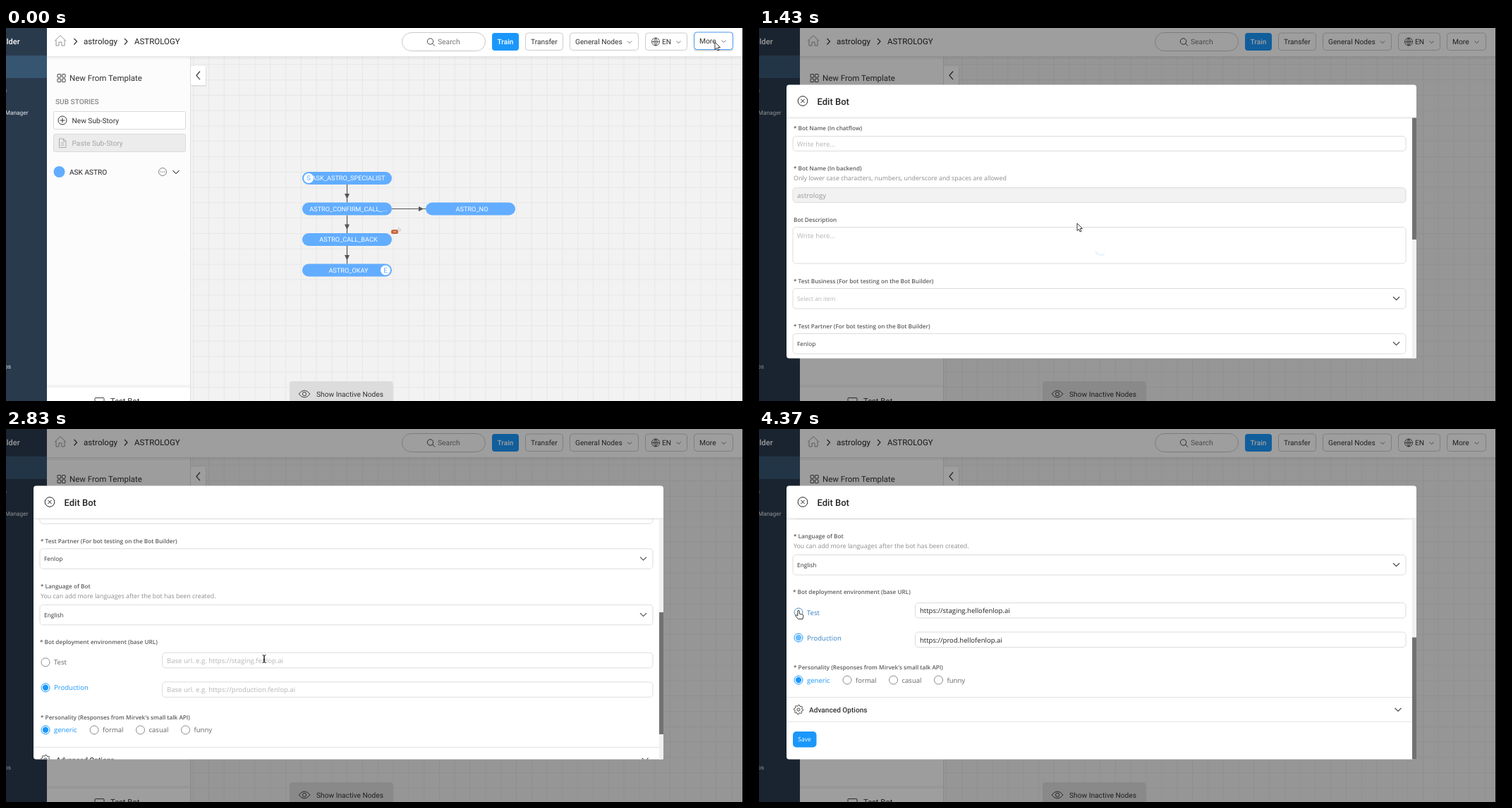
An HTML page for the animation above (4460 ms loop, 1059x529 px).

```html
<!DOCTYPE html>
<html lang="en">
<head>
<meta charset="utf-8">
<title>Edit Bot</title>
<style>
html, body { margin: 0; width: 100%; height: 100%; overflow: hidden; background: #000; }
svg { display: block; width: 1059px; height: 529px; text-rendering: geometricPrecision; }
.ui { font-family: Roboto, sans-serif; }
.form { font-family: "Open Sans", "Noto Sans", sans-serif; }
text { white-space: pre; }
</style>
</head>
<body>
<svg id="stage" viewBox="0 0 1059 529" xmlns="http://www.w3.org/2000/svg"></svg>
<script>
const LOOP = 4460;
const BLUE = '#1b97fb', NODE = '#62adff', INK = '#333', EDGE = '#555';

// ---- drawing helpers ----
const text = (x, y, s, size, fill = INK, more = '') =>
  `<text x="${x}" y="${y}" font-size="${size}" fill="${fill}" ${more}>${s}</text>`;
const rect = (x, y, w, h, fill, r = 0, more = '') =>
  `<rect x="${x}" y="${y}" width="${w}" height="${h}" rx="${r}" fill="${fill}" ${more}/>`;
const path = (d, stroke = INK, width = 1, more = '') =>
  `<path d="${d}" fill="none" stroke="${stroke}" stroke-width="${width}" ${more}/>`;
const circle = (x, y, r, fill, more = '') =>
  `<circle cx="${x}" cy="${y}" r="${r}" fill="${fill}" ${more}/>`;
const ring = (x, y, r, stroke = INK, width = 1, more = '') =>
  circle(x, y, r, 'none', `stroke="${stroke}" stroke-width="${width}" ${more}`);
const down = (x, y, w = 4.5, stroke = '#444', width = 1.1) =>
  path(`M${x - w} ${y - w / 2}l${w} ${w}l${w} ${-w}`, stroke, width);
const border = c => `stroke="${c}" stroke-width="1"`;
const group = (id, body, more = '') => `<g id="${id}" ${more}>${body}</g>`;
const mid = 'text-anchor="middle"', end = 'text-anchor="end"';

// ---- page behind the dialog ----
function grid() {
  let d = '';
  for (let x = 265.7; x < 1044; x += 21.8) d += `M${x.toFixed(1)} 41V529`;
  for (let y = 51.7; y < 529; y += 21.8) d += `M262 ${y.toFixed(1)}H1044`;
  return path(d, '#e7e7e7');
}

function node(x, y, label, labelX = x + 65.5) {
  return rect(x, y - 9, 127, 18, NODE, 9) + text(labelX, y + 3.3, label, 9.2, '#fff', mid);
}

const badge = (x, y, s) =>
  circle(x, y, 7, '#fff') + text(x, y + 3.4, s, 9.5, NODE, mid);

function flow() {
  let s = '';
  for (const y of [222, 265.5, 309]) {
    s += path(`M483.5 ${y}v25.5`, EDGE, 1.2) +
      `<path d="M480 ${y + 13}h7l-3.5 7.5z" fill="${EDGE}"/>`;
  }
  s += path('M547 256.5h48', EDGE, 1.2) + `<path d="M585 253v7l7-3.5z" fill="${EDGE}"/>`;
  s += node(420, 213, 'ASK_ASTRO_SPECIALIST', 485.5) + badge(429, 213, 'S');
  s += node(420, 256.5, 'ASTRO_CONFIRM_CALL_...') + node(595, 256.5, 'ASTRO_NO', 660.5);
  s += node(420, 300, 'ASTRO_CALL_BACK');
  s += node(420, 343.5, 'ASTRO_OKAY') + badge(538, 343.5, 'E');
  s += rect(546, 286, 10, 6, '#c8653c', 2.5) + rect(549, 288.3, 4, 1.2, '#f0c0a8') +
    path('M555 285a4 4 0 0 1 3 4M556 283a6 6 0 0 1 4 5', '#bbb', .8);
  return s;
}

function sidebar() {
  return rect(0, 0, 58, 529, '#2a3a4d') + rect(0, 39, 58, 32, '#365570') +
    text(19.5, 23, 'Builder', 11, '#fff', end + ' font-weight="500"') +
    text(1, 91, 's', 8.3, '#e6eaee', end) +
    text(31.5, 123, 'Manager', 8.3, '#e6eaee', end) +
    text(7, 483, 'os', 8.3, '#e6eaee', end);
}

function stories() {
  let s = rect(58, 41, 204, 488, '#fcfcfc') + path('M261.5 41V529', '#dedede');
  for (const [x, y] of [[73, 65.5], [79.5, 65.5], [73, 72], [79.5, 72]])
    s += rect(x, y, 4.6, 4.6, 'none', .6, border('#444'));
  s += text(90, 75, 'New From Template', 11.5);
  s += text(70, 108, 'SUB STORIES', 10.1, '#888', 'font-weight="500"');
  s += rect(67.5, 118.5, 187, 25, '#fff', 2, border('#d9d9d9')) + ring(80, 131, 6) +
    path('M76.5 131h7M80 127.500v7') + text(93.5, 134.7, 'New Sub-Story', 10.2);
  s += rect(67.5, 150.5, 187, 25, '#ececec', 2, border('#d9d9d9')) +
    path('M75.500 157h6l3.500 3.500v9h-9.500zM81.500 157v3.500h3.500M77.500 163h5M77.500 166h5', '#aaa') +
    text(93.5, 166.700, 'Paste Sub-Story', 10.2, '#a5a5a5');
  s += circle(75.5, 204, 8, NODE) + text(90, 207.600, 'ASK ASTRO', 10.1, '#222');
  s += ring(222, 204, 5.5, '#777', .9);
  for (const x of [219.500, 222, 224.500]) s += circle(x, 204, .7, '#777');
  s += down(241, 204.300, 4.5);
  s += rect(58, 506, 203, 4, '#f3f3f3') + rect(58, 510, 203, 19, '#fff') +
    rect(126, 524.500, 13, 9, 'none', 1, border('#444')) + text(148, 532.500, 'Test Bot', 11.2);
  return s;
}

const button = (x, w, label, labelX, more = '') =>
  rect(x + .5, 7, w - 1, 24.5, '#fff', 4, border('#ccc')) + text(labelX, 23, label, 10.2) + more;

function header() {
  let s = rect(58, 41, 986, 3, '#000', 0, 'opacity=".04"') + rect(58, 0, 986, 41, '#fff') +
    path('M58 40.5H1044', '#e2e2e2');
  s += path('M69 18.500L77 10.500L85 18.500M71 17v8h4v-5h4v5h4v-8', '#888', .9);
  s += path('M96.500 15l4 4l-4 4.500M168 15l4 4l-4 4.500', INK, 1.2);
  s += text(110, 23, 'astrology', 11.6, '#222') + text(182, 23, 'ASTROLOGY', 11.5, '#222');
  s += rect(561.5, 6.500, 118, 26, '#fff', 13, border('#c8c8c8')) +
    ring(601.500, 19, 4.2, '#444') + path('M604.500 22l3.500 3.500', '#444') +
    text(612, 23, 'Search', 10.3, '#777');
  s += rect(689, 7, 38, 25, BLUE, 4) +
    text(708, 23, 'Train', 10.1, '#fff', mid + ' font-weight="500"');
  s += button(736, 54, 'Transfer', 744) + button(799, 98, 'General Nodes', 807, down(884, 20, 3, '#777', 1));
  s += button(906, 60, 'EN', 930, down(953.500, 20, 3, '#777', 1) + ring(921, 19.500, 5.5, '#444', .9) +
    path('M915.500 19.500h11M921 14v11M921 14q-5 5.500 0 11M921 14q5 5.500 0 11', '#444', .8));
  s += group('more', rect(975, 7, 56, 27, '#000', 4, 'id="moreShade" opacity=".12"') +
    rect(975.5, 7, 55, 24.500, '#fff', 4, border('#ccc') + ' id="moreBox"') +
    text(983, 23, 'More', 10.3) + down(1017.500, 20, 3, '#777', 1));
  return s;
}

function page() {
  return rect(262, 41, 782, 488, '#f2f2f2') + grid() + flow() + stories() + header() + sidebar() +
    rect(262, 55, 22, 28, '#000', 3, 'opacity=".07"') + rect(262, 54, 21, 27, '#fff', 2) +
    path('M275 61.500l-5 5.800l5 5.800', INK, 1.2) +
    rect(402, 502, 147, 40, '#000', 4, 'opacity=".06"') + rect(402, 501, 146, 40, '#dcdcdc', 4) +
    path('M415 519q8-10 16 0q-8 10-16 0z', '#444') + ring(423, 519, 2.6, '#444') +
    text(440, 522.700, 'Show Inactive Nodes', 10.2);
}

const menu = () =>
  rect(870, 37, 162, 181, '#000', 4, 'opacity=".08"') + rect(871, 37, 160, 178, '#fff', 3) +
  rect(871, 47, 160, 29, '#f1f5f9') + text(885, 65.5, 'Edit Bot', 10.2);

// ---- dialog ----
const label = (y, s, x = 49) => text(x, y, s, 8.2, '#5c5c5c', 'font-weight="600"');
const hint = (y, s) => text(49, y, s, 8.87, '#8c8c8c');
const box = (y, h, x = 48, fill = '#fff') =>
  rect(x, y + .5, 917 - x, h - 1, fill, 4.5, border('#dcdcdc'));
const select = (y, s, fill, id = '') =>
  box(y, 29.500) + text(54, y + 18, s, 8.35, fill, id && `id="${id}"`) + down(903.500, y + 14.500);
const radio = (x, y, s, on, id = '') =>
  ring(x, y, 6, on ? BLUE : '#8a8a8a', 1, id && `id="${id}Ring"`) +
  (on ? circle(x, y, 4.2, BLUE, id && `id="${id}Dot"`) : '') +
  text(x + 12, y + 3.500, s, 9.55, on ? BLUE : '#666', id && `id="${id}Text"`);

function gear(x, y) {
  let d = '';
  for (let i = 0; i < 32; i++) {
    const a = i * Math.PI / 16, r = i % 4 < 2 ? 6.6 : 5.1;
    d += (i ? 'L' : 'M') + (x + r * Math.cos(a)).toFixed(1) + ' ' + (y + r * Math.sin(a)).toFixed(1);
  }
  return path(d + 'z', '#444') + ring(x, y, 2.1, '#444');
}

function form() {
  const pale = '#b5b5b5';
  return label(145, '* Bot Name (In chatflow)') + box(153, 22) + text(54, 167.500, 'Write here...', 9.5, pale) +
    label(202, '* Bot Name (In backend)') +
    hint(216, 'Only lower case characters, numbers, underscore and spaces are allowed') +
    box(226, 22, 48, '#f2f2f2') + text(54, 240.500, 'Write here...', 9.6, '#b0b0b0', 'id="backend"') +
    label(274.500, 'Bot Description') + box(282, 52.500) + text(54, 297.500, 'Write here...', 9.5, pale) +
    label(361.500, '* Test Business (For bot testing on the Bot Builder)') + select(369, 'Select an item', pale) +
    label(425.500, '* Test Partner (For bot testing on the Bot Builder)') + select(433, 'Select an item', pale, 'partner') +
    label(489.500, '* Language of Bot') + hint(503.500, 'You can add more languages after the bot has been created.') +
    select(512.500, 'English', INK) +
    label(568.500, '* Bot deployment environment (base URL)', 48) +
    radio(56, 594.500, 'Test', false, 'test') + box(580.500, 22.500, 221.5) + text(228, 595.700, '', 9.55, pale, 'id="staging"') +
    radio(56, 630.500, 'Production', true, 'prod') + box(622, 22.500, 221.5) + text(228, 637, '', 9.55, pale, 'id="live"') +
    label(675.500, "* Personality (Responses from Mirvek's small talk API)") +
    radio(56, 690.500, 'generic', true) + radio(125, 690.500, 'formal') +
    radio(190.500, 690.500, 'casual') + radio(254.500, 690.500, 'funny') +
    path('M39 715H926M39 749.500H926', '#e2e2e2') + gear(56, 732.500) +
    `<g class="ui">${text(71, 736.200, 'Advanced Options', 10.1, INK, 'font-weight="500"')}</g>` +
    down(906, 732.500) +
    rect(48, 763.500, 33.500, 22.500, BLUE, 5) + text(64.500, 777.700, 'Save', 8.5, '#fff', mid);
}

function dialog() {
  return rect(39, 80.500, 893, 388, '#fff', 4) +
    `<g clip-path="url(#body)" class="form">${group('form', form())}</g>` +
    rect(926, 127, 6, 341.500, '#f1f1f1') + rect(926, 127, 6, 173, '#717171', 0, 'id="thumb"') +
    rect(39, 127, 887, 2, '#000', 0, 'opacity=".04"') + path('M39 127H932', '#e0e0e0') +
    ring(62, 103.500, 6.8, '#222') + path('M59.300 100.800l5.400 5.400M64.700 100.800l-5.400 5.400', '#222') +
    text(82.500, 109, 'Edit Bot', 13, '#222', 'font-weight="500"') +
    path('M485 304a9 9 0 0 1 9 9', BLUE, 1.8, 'id="spin" stroke-linecap="round"');
}

// ---- pointers, each with its hot spot at 0,0 ----
const shape = d => `<path d="${d}" fill="#fff" stroke="#222" stroke-width=".9" stroke-linejoin="round"/>`;
const pointers = {
  arrow: shape('M0 0V10.500L2.500 8.200L4.200 12L6 11.200L4.300 7.500H7.500Z'),
  hand: shape('M-1.200 .8q1.200-1.600 2.400 0V5l4.500 1.200q1.300.4 1.200 2L6 12.500H-.5L-4.200 8q-.2-1.700 1.700-1L-1.200 8Z'),
  beam: path('M-2.500-5.500Q0-5.500 0-4V4Q0 5.500-2.500 5.500M2.500-5.500Q0-5.500 0-4V4Q0 5.500 2.500 5.500M-1.300 1h2.600', '#222', 1)
};

document.getElementById('stage').innerHTML =
  '<defs><clipPath id="body"><rect x="39" y="127" width="887" height="341.5"/></clipPath></defs>' +
  `<g class="ui">${page()}${group('menu', menu())}${rect(0, 0, 1044, 529, '#000', 0, 'id="shade"')}` +
  `${group('dialog', dialog())}</g>` +
  circle(257, 258, 7.5, '#f7ec1e', 'id="click" opacity=".8"') +
  group('pointer', Object.entries(pointers).map(([k, v]) => group(k, v)).join('')) +
  rect(1044, 0, 15, 529, '#000');

// ---- motion: rows of [ms, value...] ----
const moves = {
  pointer: [[0, 1005, 20], [130, 1005, 20], [470, 925, 58], [720, 922, 57], [780, 922, 57], [1100, 505, 285],
    [1430, 451, 277], [1500, 451, 277], [1680, 366, 326], [2880, 366, 326], [3280, 257, 299], [3600, 257, 299],
    [3710, 257, 257.500], [3900, 257, 257.500], [4060, 160, 318], [4250, 56, 257]],
  scroll: [[1640, 0], [1760, 20], [1980, 84], [2210, 148], [2300, 160], [2560, 222], [2760, 260], [2830, 263.500],
    [2950, 285], [3150, 322], [3290, 334.500]],
  menu: [[80, 0], [200, 1], [600, 1], [680, 0]],
  shade: [[600, 0], [720, .37], [800, .38]],
  fade: [[610, 0], [720, .84], [810, 1]],
  slide: [[610, 12], [720, 1], [810, 0]],
  spin: [[680, 0], [720, .25], [880, .6], [1300, .6], [1430, .12], [1500, 0]],
  lift: [[0, 1], [220, 1], [330, 0], [4459, 0]],
  pick: [[4290, 0], [4370, .5], [4460, 1]]
};

function at(rows, t) {
  const i = rows.findIndex(r => r[0] > t);
  if (i === 0) return rows[0].slice(1);
  if (i < 0) return rows[rows.length - 1].slice(1);
  const a = rows[i - 1], b = rows[i], k = (t - a[0]) / (b[0] - a[0]);
  return a.slice(1).map((v, n) => v + (b[n + 1] - v) * k);
}

const mix = (a, b, k) => `rgb(${a.map((v, i) => Math.round(v + (b[i] - v) * k)).join(',')})`;
const els = {};
document.querySelectorAll('#stage [id]').forEach(e => els[e.id] = e);
const set = (id, name, value) => els[id].setAttribute(name, value);
const show = (id, on) => set(id, 'visibility', on ? 'visible' : 'hidden');
function write(id, s, fill) {
  if (els[id].textContent !== s) els[id].textContent = s;
  set(id, 'fill', fill);
}

function draw(t) {
  const val = k => at(moves[k], t)[0];

  const lift = val('lift');
  set('more', 'transform', `translate(0 ${-lift})`);
  set('moreBox', 'stroke', mix([204, 204, 204], [70, 150, 235], lift));
  set('moreShade', 'opacity', .14 * lift);
  set('menu', 'opacity', val('menu'));
  set('shade', 'opacity', val('shade'));
  set('dialog', 'opacity', val('fade'));
  set('dialog', 'transform', `translate(0 ${val('slide')})`);
  set('spin', 'opacity', val('spin'));
  set('spin', 'transform', `rotate(${(t - 720) * .72} 485 313)`);

  const y = val('scroll'), loaded = t >= 1190;
  set('form', 'transform', `translate(0 ${-y})`);
  set('thumb', 'y', 127 + y * .504);
  set('thumb', 'height', loaded ? 173 : 178);
  write('backend', loaded ? 'astrology' : 'Write here...', loaded ? '#999' : '#b0b0b0');
  write('partner', loaded ? 'Fenlop' : 'Select an item', loaded ? INK : '#b5b5b5');

  const live = t >= 3540, staging = t >= 4000;
  write('live', live ? 'https://prod.hellofenlop.ai' : 'Base url. e.g. https://production.fenlop.ai', live ? '#222' : '#b5b5b5');
  write('staging', staging ? 'https://staging.hellofenlop.ai' : 'Base url. e.g. https://staging.fenlop.ai', staging ? '#222' : '#b5b5b5');

  const pick = val('pick');
  set('testRing', 'stroke', mix([138, 138, 138], [27, 151, 251], pick));
  set('testText', 'fill', pick ? '#3b82c4' : '#666');
  set('prodText', 'fill', pick ? '#3b82c4' : BLUE);
  set('prodDot', 'opacity', 1 - .7 * pick);

  const [px, py] = at(moves.pointer, t);
  const kind = t < 330 ? 'arrow' : t < 800 ? 'hand' : t < 1640 ? 'arrow' : t < 4130 ? 'beam' : 'hand';
  set('pointer', 'transform', `translate(${px} ${py})`);
  for (const k in pointers) show(k, k === kind);
  set('click', 'cy', py);
  show('click', (t >= 3380 && t < 3480) || (t >= 3730 && t < 3860));
}

function tick() {
  draw(performance.now() % LOOP);
  requestAnimationFrame(tick);
}
tick();
</script>
</body>
</html>
```
